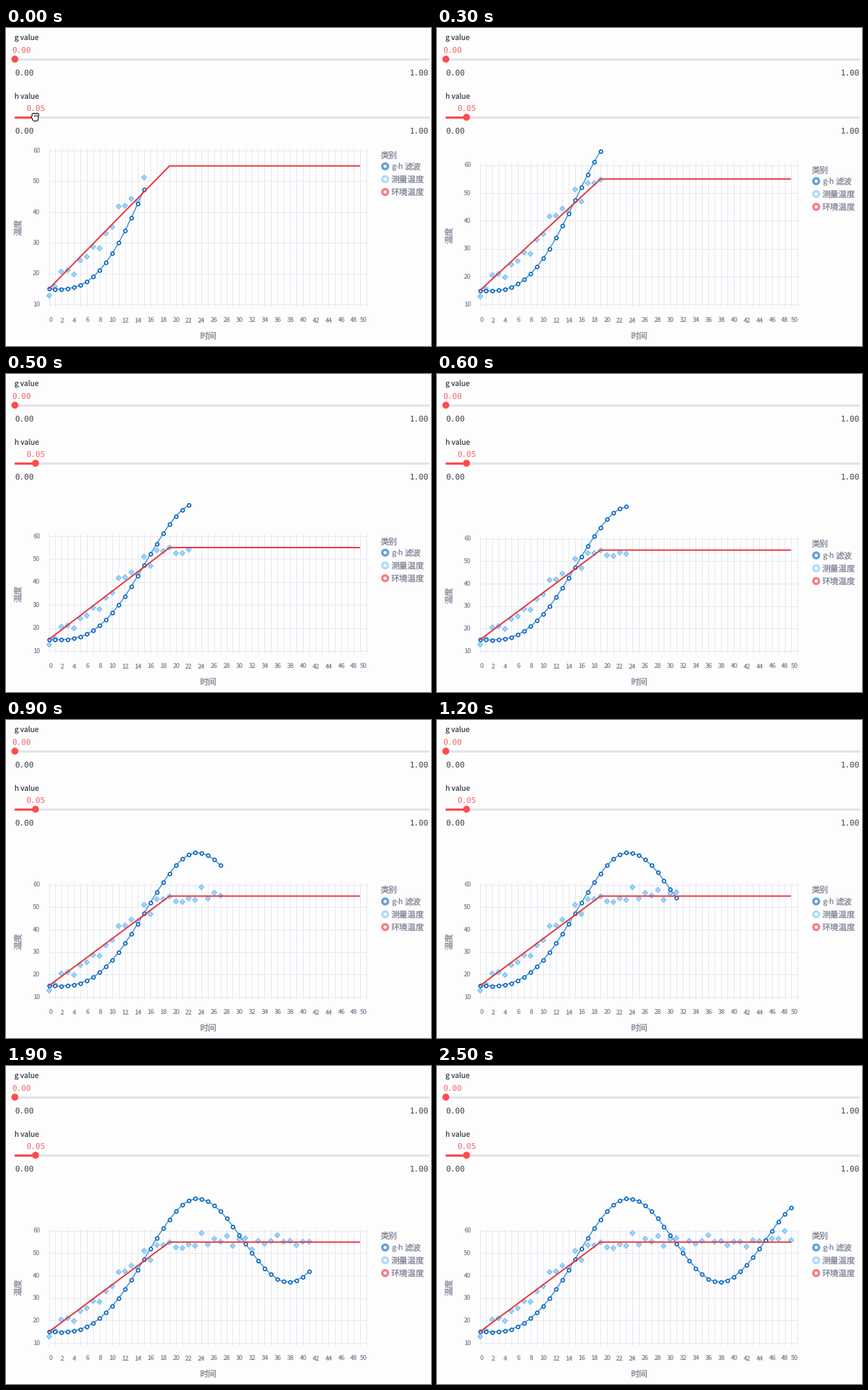
Recreate the animation shown at these times as a matplotlib script. Size 600 by 449 pixels, loop 3.3 s.

```python
import numpy as np
import matplotlib.pyplot as plt
from matplotlib.animation import FuncAnimation
from matplotlib.patches import Circle

WIDTH, HEIGHT, DPI = 600, 449, 100
FRAMES, INTERVAL, GROWTH_FRAMES = 33, 100, 24
PT = 72 / DPI

SANS, MONO = "Noto Sans CJK JP", "DejaVu Sans Mono"
INK, GREY, GRID = "#41434e", "#808495", "#e6e8ef"
TRACK, ACCENT, READOUT = "#e1e4ee", "#ff4b4b", "#f2686b"
BLUE, BLUE_LINE, SKY, RED = "#0a66bd", "#4f97d8", "#83c5f6", "#ea3236"

LEFT, STEP = 60.5, 8.965
BOTTOM, FULL_TOP = 394.3, 168.7
LOW, HIGH = 9, 61
MARKER_PAD = 3.2

# Arms of the plus marker, two fifths of its size wide.
QUARTER = np.array([(1, -0.4), (1, 0.4), (0.4, 0.4)])
TURN = np.array([(0, 1), (-1, 0)])
PLUS = np.vstack([QUARTER @ np.linalg.matrix_power(TURN, k)
                  for k in range(4)] + [QUARTER[:1]])

plt.rcParams["text.hinting"] = "none"


def gh_filter(data, start, g, h):
    value, rate, result = start, 0.0, []
    for z in data:
        value += rate
        residual = z - value
        rate += h * residual
        value += g * residual
        result.append(value)
    return np.array(result)


# The sensor drifts slowly around the true temperature and jitters on top.
TIMES = np.arange(50)
AMBIENT = np.interp(TIMES, [0, 19], [15, 55])
DRIFT = np.repeat([-1.2, 1.2, -1.5, 1.6, -0.9, 1.6, -1.0, 1.7],
                  [11, 9, 4, 8, 4, 3, 4, 7])
JITTER = np.random.default_rng(4).normal(0, 1.5, TIMES.size)
MEASURED = AMBIENT + DRIFT + JITTER
FILTERED = gh_filter(AMBIENT + DRIFT, 15.0, 0.0, 0.05)

fig = plt.figure(figsize=(WIDTH / DPI, HEIGHT / DPI), dpi=DPI,
                 facecolor="#fdfdfe")
ax = fig.add_axes([0, 0, 1, 1])


def label(x, y, text, size, color=GREY, font=SANS, **kw):
    ax.text(x, y, text, fontsize=size * PT, color=color, family=font, **kw)


def stroke(xs, ys, color, width, cap="round", **kw):
    ax.plot(xs, ys, color=color, lw=width * PT, solid_capstyle=cap, **kw)


def slider(name, y, value, thumb=True):
    x0, x1 = 12.5, 595.5
    x = x0 + value * (x1 - x0)
    label(12.3, y - 26.2, name, 10.3, INK)
    label(max(x, 21.5), y - 9.2, f"{value:.2f}", 11.2, READOUT, MONO,
          ha="center")
    stroke([x0, x1], [y, y], TRACK, 3.2)
    stroke([x0, x], [y, y], ACCENT, 3.2)
    if thumb:
        ax.add_patch(Circle((x, y), 4.9, color=ACCENT, lw=0, zorder=3))
    label(12.6, y + 23.2, "0.00", 11.2, INK, MONO)
    label(596.5, y + 23.2, "1.00", 11.2, INK, MONO, ha="right")


def hand(x, y):
    for color, width in (("black", 4.4), ("white", 2.4)):
        for dx in (-3, -1, 1, 3):
            stroke([x + dx, x + 0.7 * dx], [y - 3.5, y + 4], color, width,
                   zorder=4)
        stroke([x - 4.2, x - 1], [y, y + 4], color, width, zorder=4)
    for dx in (-2, 0, 2):
        stroke([x + dx, x + dx], [y - 3.5, y - 1], "black", 0.7, zorder=5)


def legend(top):
    label(529, top + 14.8, "类别", 12)
    rows = [("#649fd8", ""), ("#b0dafb", "测量温度"), ("#f67c7f", "环境温度")]
    for i, (color, text) in enumerate(rows):
        y = top + 26.6 + 18.1 * i
        ax.add_patch(Circle((535.3, y), 4, facecolor="white",
                            edgecolor=color, lw=3.3 * PT))
        label(544, y + 4.4, text, 11.8)
    label(544.3, top + 30.8, "g-h", 10.7)
    label(562.3, top + 31, "滤波", 11.8)


def chart(last):
    # Points above the axis range push the plot's top edge down.
    full_scale = (BOTTOM - FULL_TOP) / (HIGH - LOW)
    overflow = (FILTERED[:last + 1].max() - HIGH) * full_scale + MARKER_PAD
    top = FULL_TOP + max(0, overflow)
    scale = (BOTTOM - top) / (HIGH - LOW)

    def px(t):
        return LEFT + STEP * np.asarray(t)

    def py(v):
        return BOTTOM - scale * (np.asarray(v) - LOW)

    ax.vlines(px(range(51)), top, BOTTOM, color=GRID, lw=PT, zorder=1)
    tens = range(10, 61, 10)
    ax.hlines(py(tens), px(0), px(50), color=GRID, lw=PT, zorder=1)
    for v in tens:
        label(48.3, py(v) + 3.6, str(v), 9, ha="right")
    for t in range(0, 51, 2):
        x, align = px(t) + 0.6, "center"
        if t == 0:
            x, align = 60.4, "left"
        elif t == 50:
            x, align = 510, "right"
        label(x, 415.5, str(t), 9, ha=align)
    label(285, 439.3, "时间", 12, ha="center")
    label(18.3, (top + BOTTOM) / 2, "温度", 12, rotation=90,
          ha="center", va="center")

    t = TIMES[:last + 1]
    stroke(px(t), py(FILTERED[t]), BLUE_LINE, 1.6, zorder=3)
    ax.plot(px(t), py(MEASURED[t]), ls="", marker=PLUS, ms=6.6 * PT,
            mfc="#d3eafc", mec=SKY, mew=1.6 * PT, zorder=4)
    ax.plot(px(t), py(FILTERED[t]), ls="", marker="o", ms=4.7 * PT,
            mfc="white", mec=BLUE, mew=1.7 * PT, zorder=5)
    stroke(px(TIMES), py(AMBIENT), RED, 1.9, cap="butt", zorder=6)
    legend(top)


def last_point(frame):
    u = min(frame / GROWTH_FRAMES, 1)
    return int(15 + 34 * u - 2 * u * u * (1 - u))


def draw(frame):
    ax.clear()
    ax.set(xlim=(0, WIDTH), ylim=(HEIGHT, 0))
    ax.axis("off")
    grabbing = frame == 0
    slider("g value", 44, 0.0)
    slider("h value", 126, 0.05, thumb=not grabbing)
    if grabbing:
        hand(41.5, 125.5)
    chart(last_point(frame))
    return []


anim = FuncAnimation(fig, draw, frames=FRAMES, interval=INTERVAL,
                     init_func=lambda: [], repeat=True, repeat_delay=0)
plt.show()
```
